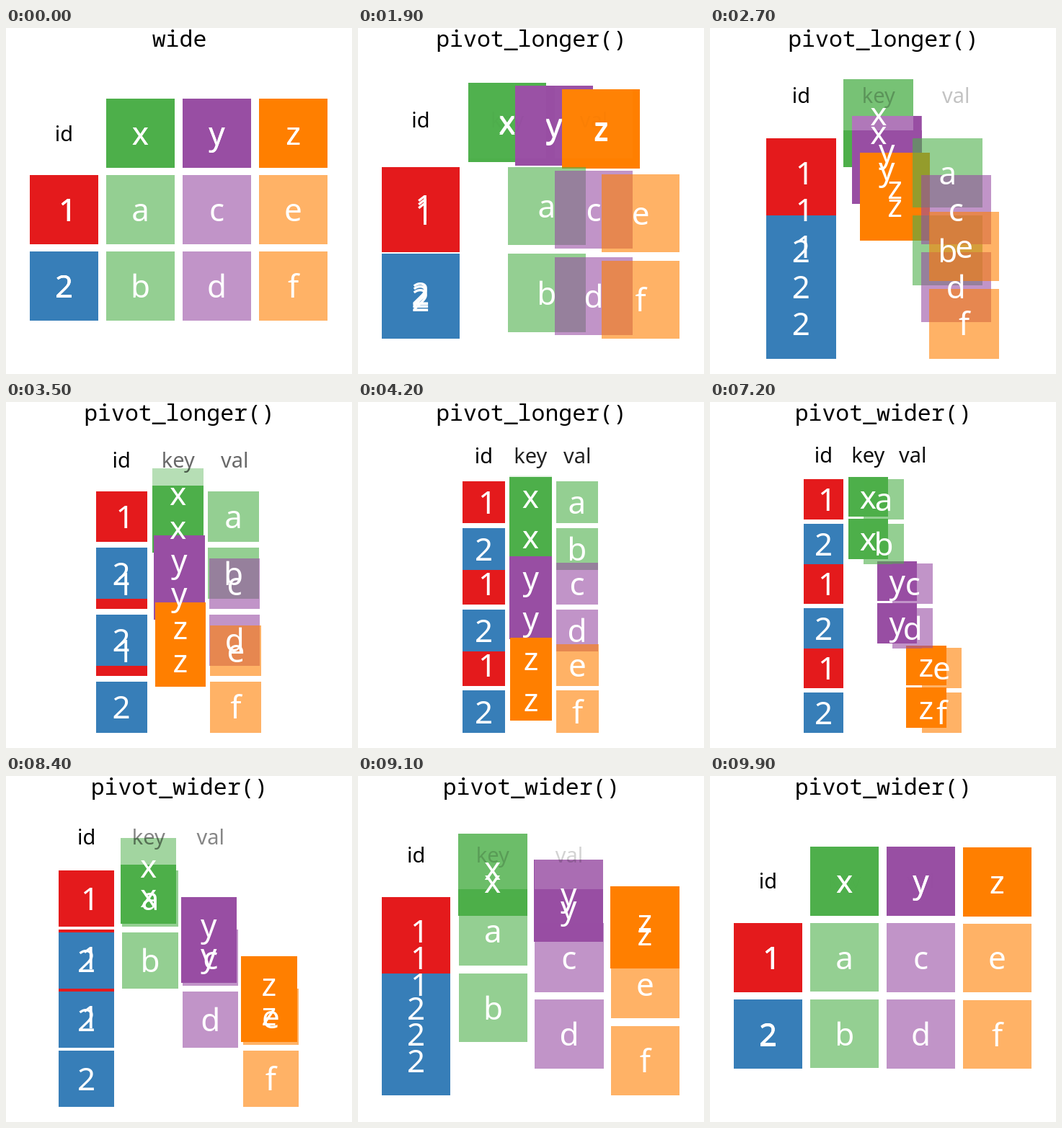
An HTML page with a canvas for the animation above (10 s loop, 480 by 480 pixels).

```html
<!DOCTYPE html>
<html lang="en">
<head>
<meta charset="utf-8">
<title>Wide and long tables</title>
<style>
  html, body { margin: 0; width: 100%; height: 100%; overflow: hidden; background: #fff; }
  canvas { display: block; width: 480px; height: 480px; }
</style>
</head>
<body>
<canvas id="stage"></canvas>
<script>
const SIZE = 480, PANEL = 413.4, CX = 239.5, CY = 252, TILE = 0.9;
const STEP = 100, STEPS = 100;
const SANS = '"Noto Sans", "Open Sans", sans-serif';
const MONO = '"Noto Sans Mono", "DejaVu Sans Mono", monospace';
const RED = '#e41a1c', BLUE = '#377eb8', GREEN = '#4daf4a', PURPLE = '#984ea3', ORANGE = '#ff7f00';

const canvas = document.getElementById('stage');
const dpr = window.devicePixelRatio || 1;
canvas.width = canvas.height = Math.round(SIZE * dpr);
const ctx = canvas.getContext('2d');
ctx.scale(dpr, dpr);
ctx.textAlign = 'center';

// Each cell has a [column, row] place in the wide and in the long table.
const cell = (text, fill, wide, long, alpha = 1) => ({ text, fill, wide, long, alpha });
const groups = [['x', GREEN, 'ab'], ['y', PURPLE, 'cd'], ['z', ORANGE, 'ef']];
const ids = [], keys = [], values = [];
[RED, BLUE].forEach((fill, i) => {
  for (let g = 0; g < 3; g++) ids.push(cell(String(i + 1), fill, [0, i + 1], [0, 2 * g + i + 1]));
});
groups.forEach(([name, fill, letters], g) => {
  for (let i = 0; i < 2; i++) {
    const row = 2 * g + i + 1;
    keys.push(cell(name, fill, [g + 1, 0], [1, row]));
    values.push(cell(letters[i], fill, [g + 1, i + 1], [2, row], 0.6));
  }
});
const cells = [...ids, ...keys, ...values];

const sineInOut = p => (1 - Math.cos(Math.PI * p)) / 2;
const expOut = p => p >= 1 ? 1 : 1 - 2 ** (-10 * p);
const mix = (a, b, q) => a + (b - a) * q;

// qx and qy: 0 is the wide table, 1 the long one.
function stateAt(n) {
  if (n < 17) return { title: 'wide', qx: 0, qy: 0 };
  if (n < 51) {
    const p = (n - 16) / 34;
    return { title: 'pivot_longer()', qx: expOut(p), qy: sineInOut(p) };
  }
  if (n < 68) return { title: 'long', qx: 1, qy: 1 };
  const p = (n - 67) / 33;
  return { title: 'pivot_wider()', qx: 1 - expOut(p), qy: 1 - sineInOut(p) };
}

function write(text, x, y, font, color, alpha = 1) {
  ctx.globalAlpha = alpha;
  ctx.font = font;
  ctx.fillStyle = color;
  ctx.fillText(text, x, y);
}

function draw(n) {
  const { title, qx, qy } = stateAt(n);
  const placed = cells.map(c => ({
    ...c,
    col: mix(c.wide[0], c.long[0], qx),
    row: mix(c.wide[1], c.long[1], qy)
  }));

  // The view always fits the whole table into the panel.
  const maxCol = Math.max(...placed.map(c => c.col));
  const maxRow = Math.max(...placed.map(c => c.row));
  const unit = PANEL / (Math.max(maxCol, maxRow) + TILE);
  const px = col => CX + (col - maxCol / 2) * unit;
  const py = row => CY + (row - maxRow / 2) * unit;

  function tile(col, row, fill, alpha) {
    const half = TILE / 2;
    const x0 = Math.round(px(col - half)), x1 = Math.round(px(col + half));
    const y0 = Math.round(py(row - half)), y1 = Math.round(py(row + half));
    ctx.globalAlpha = alpha;
    ctx.fillStyle = fill;
    ctx.fillRect(x0, y0, x1 - x0, y1 - y0);
  }

  ctx.globalAlpha = 1;
  ctx.fillStyle = '#fff';
  ctx.fillRect(0, 0, SIZE, SIZE);

  placed.forEach(c => tile(c.col, c.row, c.fill, c.alpha));
  const heads = [['id', 0, 1], ['key', 1, qy], ['val', 2, qy]];
  heads.forEach(([, col, alpha]) => tile(col, 0, '#fff', alpha));
  heads.forEach(([text, col, alpha]) =>
    write(text, px(col), py(0) + 10.5, `29px ${SANS}`, '#000', alpha));
  placed.forEach(c =>
    write(c.text, px(c.col) + (c.text === '1' ? 5 : 0), py(c.row) + 16, `44px ${SANS}`, '#fff'));
  write(title, 240.5, 26, `31.5px ${MONO}`, '#000');
}

let shown = -1;
function tick() {
  const n = Math.floor(performance.now() / STEP) % STEPS;
  if (n !== shown) draw(shown = n);
  requestAnimationFrame(tick);
}
tick();
</script>
</body>
</html>
```
